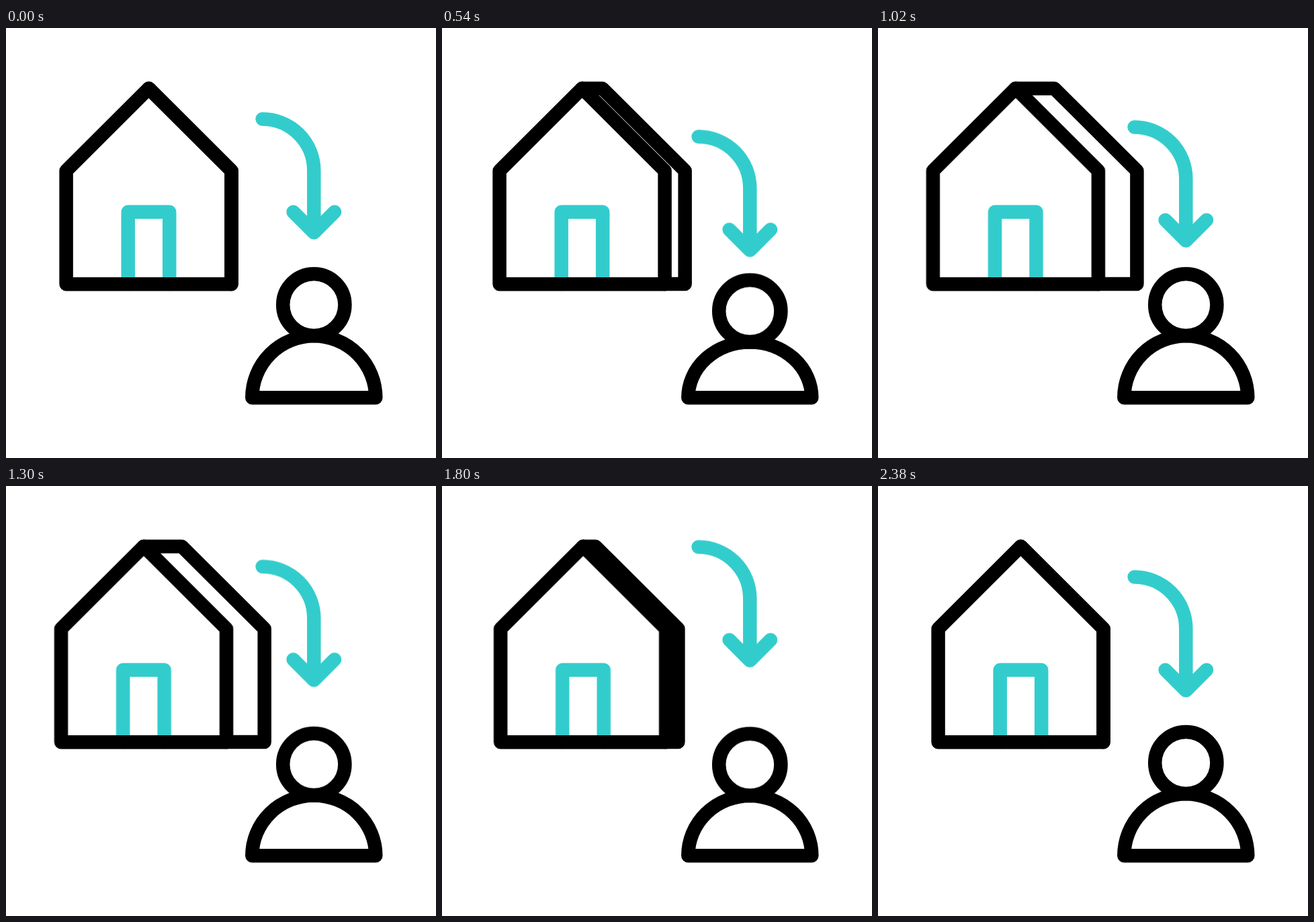
These frames come from a looping animation (640x640 px, 2.4 s). An HTML page without scripts:

```html
<!DOCTYPE html>
<html lang="en">
<head>
<meta charset="utf-8">
<title>House to person</title>
<style>
  html, body { margin: 0; width: 100%; height: 100%; overflow: hidden; background: #fff; }
  svg { display: block; width: 100%; height: 100%; }
  svg * { stroke-linecap: round; stroke-linejoin: round; }

  .ink, .teal { fill: none; stroke: #000; stroke-width: 20.5; }
  .teal { stroke: #3cc; }
  .front, .back, .arrow, .head, .body { animation: 2.4s infinite; }

  .front { animation-name: slide; }
  .back { animation-name: deepen; }
  .front, .back, .arrow { animation-timing-function: cubic-bezier(.55, 0, .45, 1); }
  .arrow { animation-name: swing; }
  .head { animation-name: nod; }
  .body { animation-name: squash; }

  @keyframes slide {
    0%, 93.33%, 100% { transform: none; }
    44.17%, 49.17% { transform: translateX(-7.7px); }
  }
  @keyframes deepen {
    0%, 93.33%, 100% { d: path("M212.5 90L212.5 90L335.5 212.5L335.5 381L335.5 381"); }
    44.17%, 49.17% { d: path("M204.8 90L262.5 90L385.5 212.5L385.5 381L327.8 381"); }
  }
  @keyframes swing {
    0%, 100% { transform: none; }
    22.08% { transform: translateY(26.2px); }
    82.08% { transform: translateY(-46px); }
  }

  /* quick press, slow recovery, twice per loop */
  @keyframes nod {
    0%, 42.5%, 46.67%, 89.17%, 100% {
      transform: none;
      animation-timing-function: cubic-bezier(.6, 0, .8, 1);
    }
    18.33%, 65% {
      transform: translateY(12px);
      animation-timing-function: cubic-bezier(.3, 0, .05, 1);
    }
  }
  @keyframes squash {
    0%, 42.5%, 46.67%, 89.17%, 100% {
      d: path("M366.3 550.3A92 92 0 0 1 550.3 550.3Z");
      animation-timing-function: cubic-bezier(.6, 0, .8, 1);
    }
    18.33%, 65% {
      d: path("M366.3 550.3A92 80 0 0 1 550.3 550.3Z");
      animation-timing-function: cubic-bezier(.3, 0, .05, 1);
    }
  }
</style>
</head>
<body>
<svg viewBox="0 0 640 640">
  <path class="ink back" d="M212.5 90L212.5 90L335.5 212.5L335.5 381L335.5 381"/>
  <g class="front">
    <path class="teal" d="M181.7 381V273.8H243.2V381"/>
    <path class="ink" d="M212.6 89.8L335.6 212.6V381.2H89.6V212.6Z"/>
  </g>
  <path class="teal arrow" d="M381.6 135.6A76.7 76.7 0 0 1 458.3 212.3V304.5M427.6 273.8L458.3 304.5L489 273.8"/>
  <circle class="ink head" cx="458.3" cy="412" r="46.1"/>
  <path class="ink body" d="M366.3 550.3A92 92 0 0 1 550.3 550.3Z"/>
</svg>
</body>
</html>
```
